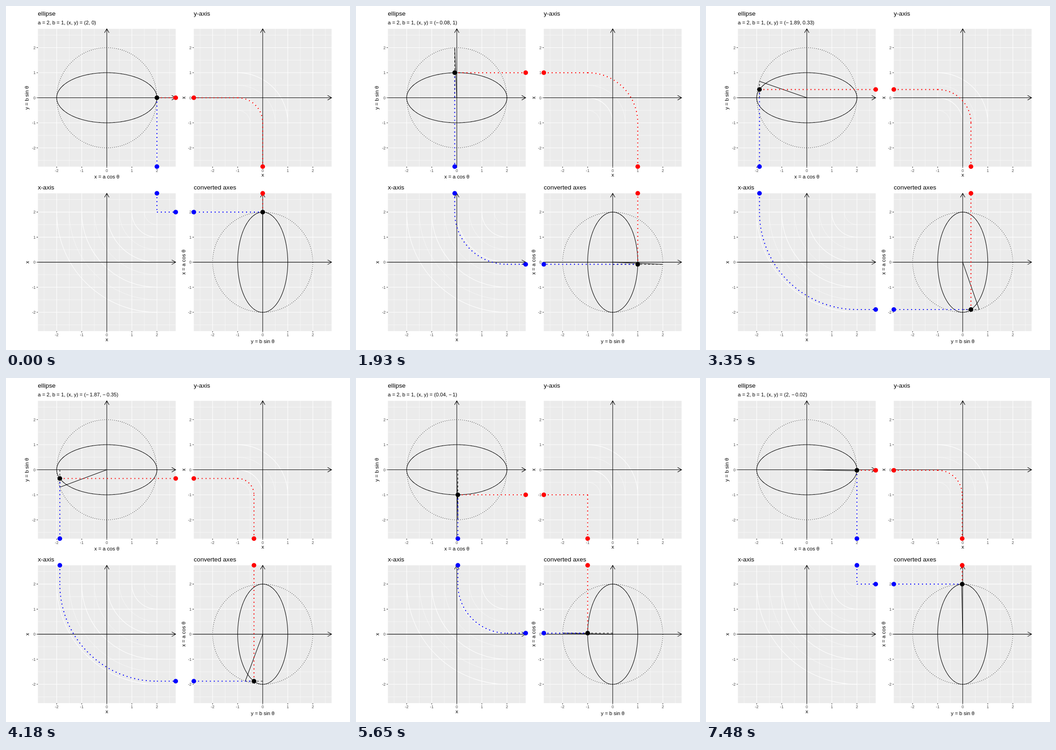
An HTML page that plays this animation: 748x748 px, repeating every 7500 ms.

```html
<!DOCTYPE html>
<html lang="en">
<head>
<meta charset="utf-8">
<title>Ellipse with converted axes</title>
<style>
  html, body { margin: 0; width: 100%; height: 100%; overflow: hidden; background: #fff; }
  svg { display: block; width: 748px; height: 748px; }
  text { font-family: "Liberation Sans", Arial, sans-serif; font-size: 11.2px; fill: #000; white-space: pre; }
  .title { font-size: 13.6px; }
  .tick { font-size: 8.8px; fill: #4d4d4d; }
  .mid { text-anchor: middle; }
  .end { text-anchor: end; }
  path { fill: none; stroke: #000; stroke-width: 1.07; }
  .major { stroke: #fff; }
  .minor { stroke: #fff; stroke-width: .53; }
  .mark { stroke: #333; }
  .fine { stroke-dasharray: 1.07 3.2; }
  .dash { stroke-dasharray: 4.27; }
  .red, .blue { stroke-width: 2.13; stroke-dasharray: 2.13 6.4; }
  .red { stroke: #f00; }
  .blue { stroke: #00f; }
</style>
</head>
<body>
<svg id="stage" viewBox="0 0 748 748"></svg>
<script>
const NS = "http://www.w3.org/2000/svg";
const stage = document.getElementById("stage");
const UNIT = 54.48, LIM = 2.75, HALF = UNIT * LIM;
const A = 2, B = 1;
const LOOP = 7500, STEPS = 300;

function add(tag, attrs, text) {
  const el = document.createElementNS(NS, tag);
  for (const k in attrs) el.setAttribute(k, attrs[k]);
  if (text !== undefined) el.textContent = text;
  stage.appendChild(el);
  return el;
}

const path = (cls, d = "") => add("path", { class: cls, d });
const label = (cls, x, y, text) => add("text", { class: cls, x, y }, text);
const turned = (x, y, text) =>
  add("text", { class: "mid", transform: `translate(${x} ${y}) rotate(-90)` }, text);

// A panel maps plot units to pixels around its centre.
function panel(cx, cy) {
  const pt = (x, y) => `${(cx + x * UNIT).toFixed(2)} ${(cy - y * UNIT).toFixed(2)}`;
  const seg = (x1, y1, x2, y2) => `M${pt(x1, y1)}L${pt(x2, y2)}`;
  const arc = (x1, y1, x2, y2, r, sweep) => {
    const R = (r * UNIT).toFixed(2);
    return `M${pt(x1, y1)}A${R} ${R} 0 0 ${sweep} ${pt(x2, y2)}`;
  };
  return { cx, cy, left: cx - HALF, bottom: cy + HALF, pt, seg, arc };
}

const isWhole = v => Number.isInteger(v);
const gridClass = v => isWhole(v) ? "major" : "minor";

function drawGrid(p) {
  add("rect", { x: p.left, y: p.cy - HALF, width: 2 * HALF, height: 2 * HALF, fill: "#ebebeb" });
  const lines = { minor: "", major: "" };
  for (let v = -2.5; v <= 2.5; v += .5)
    lines[gridClass(v)] += p.seg(v, -LIM, v, LIM) + p.seg(-LIM, v, LIM, v);
  path("minor", lines.minor);
  path("major", lines.major);
  for (let v = -2; v <= 2; v++) {
    const x = p.cx + v * UNIT, y = p.cy - v * UNIT;
    path("mark", `M${x} ${p.bottom}v2.75M${p.left} ${y}h-2.75`);
    label("tick mid", x, p.bottom + 11.4, v);
    label("tick end", p.left - 4.9, y + 3.15, v);
  }
}

function drawAxes(p) {
  const right = p.cx + HALF, top = p.cy - HALF;
  path("", `M${p.left} ${p.cy}H${right}M${right - 8.66} ${p.cy - 5}L${right} ${p.cy}l-8.66 5` +
    `M${p.cx} ${p.bottom}V${top}M${p.cx - 5} ${top + 8.66}L${p.cx} ${top}l5 8.66`);
}

function closedCurve(p, cls, rx, ry) {
  const n = 300;
  let d = "";
  for (let i = 0; i <= n; i++) {
    const t = 2 * Math.PI * i / n;
    d += (i ? "L" : "M") + p.pt(rx * Math.cos(t), ry * Math.sin(t));
  }
  path(cls, d);
}

const bendY = (p, v) => p.arc(-1, v, v, -1, v + 1, 1);
const bendX = (p, v) => p.arc(v, 2, 2, v, 2 - v, 0);

const p1 = panel(219.2, 199.5), p2 = panel(558.2, 199.5);
const p3 = panel(219.2, 557.1), p4 = panel(558.2, 557.1);
const moving = [];

// Registers a path whose outline is a function of the state s.
const live = (cls, fn) => {
  const el = path(cls);
  moving.push(s => el.setAttribute("d", fn(s)));
};
const dot = (p, fill, fn) => {
  const el = add("circle", { r: 5, fill });
  moving.push(s => {
    const [x, y] = fn(s);
    el.setAttribute("cx", p.cx + x * UNIT);
    el.setAttribute("cy", p.cy - y * UNIT);
  });
};

// Ellipse
drawGrid(p1);
drawAxes(p1);
closedCurve(p1, "fine", A, A);
closedCurve(p1, "", A, B);
live("", s => p1.seg(0, 0, s.x, s.h));
live("dash", s => p1.seg(s.x, 0, s.x, s.h));
live("blue", s => p1.seg(s.x, s.y, s.x, -LIM));
live("red", s => p1.seg(s.x, s.y, LIM, s.y));
dot(p1, "#000", s => [s.x, s.y]);
dot(p1, "#00f", s => [s.x, -LIM]);
dot(p1, "#f00", s => [LIM, s.y]);

// y-axis
drawGrid(p2);
for (let v = -.5; v <= 1; v += .5) path(gridClass(v), bendY(p2, v));
drawAxes(p2);
live("red", s => p2.seg(-LIM, s.y, -1, s.y) + bendY(p2, s.y) + p2.seg(s.y, -1, s.y, -LIM));
dot(p2, "#f00", s => [-LIM, s.y]);
dot(p2, "#f00", s => [s.y, -LIM]);

// x-axis
drawGrid(p3);
for (let v = -2; v < 2; v += .5) path(gridClass(v), bendX(p3, v));
drawAxes(p3);
live("blue", s => p3.seg(s.x, LIM, s.x, 2) + bendX(p3, s.x) + p3.seg(2, s.x, LIM, s.x));
dot(p3, "#00f", s => [s.x, LIM]);
dot(p3, "#00f", s => [LIM, s.x]);

// Converted axes
drawGrid(p4);
drawAxes(p4);
closedCurve(p4, "fine", A, A);
closedCurve(p4, "", B, A);
live("", s => p4.seg(0, 0, s.h, s.x));
live("dash", s => p4.seg(0, s.x, s.h, s.x));
live("blue", s => p4.seg(s.y, s.x, -LIM, s.x));
live("red", s => p4.seg(s.y, s.x, s.y, LIM));
dot(p4, "#000", s => [s.y, s.x]);
dot(p4, "#00f", s => [-LIM, s.x]);
dot(p4, "#f00", s => [s.y, LIM]);

// Titles
label("title", 69.3, 20.8, "ellipse");
label("title", 408.3, 20.8, "y-axis");
label("title", 69.3, 398.6, "x-axis");
label("title", 408.3, 398.6, "converted axes");
label("mid", p1.cx, 375, "x = a cos θ");
label("mid", p2.cx, 371.4, "x");
label("mid", p3.cx, 729.2, "x");
label("mid", p4.cx, 732.6, "y = b sin θ");
turned(48.8, p1.cy, "y = b sin θ");
turned(390, p2.cy, "x");
turned(50, p3.cy, "x");
turned(390, p4.cy, "x = a cos θ");

const caption = label("", 69.3, 39.6, "");
const num = v => String(+v.toFixed(2)).replace("-", '− <tspan dx="-1">').replace(/(<.*)$/, "$1</tspan>");
moving.push(s => {
  caption.innerHTML = `a = ${A}, b = ${B}, (x, y) = (${num(s.x)}, ${num(s.y)})`;
});

let shown = -1;
function draw(now) {
  // Steps alternate between 30 and 20 ms.
  const t = now % LOOP;
  const step = 2 * Math.floor(t / 50) + (t % 50 >= 30 ? 1 : 0);
  if (step !== shown) {
    shown = step;
    const angle = 2 * Math.PI * step / STEPS;
    const s = { x: A * Math.cos(angle), y: B * Math.sin(angle), h: A * Math.sin(angle) };
    moving.forEach(update => update(s));
  }
}

const start = performance.now();
function tick() {
  draw(performance.now() - start);
  requestAnimationFrame(tick);
}
tick();
</script>
</body>
</html>
```
